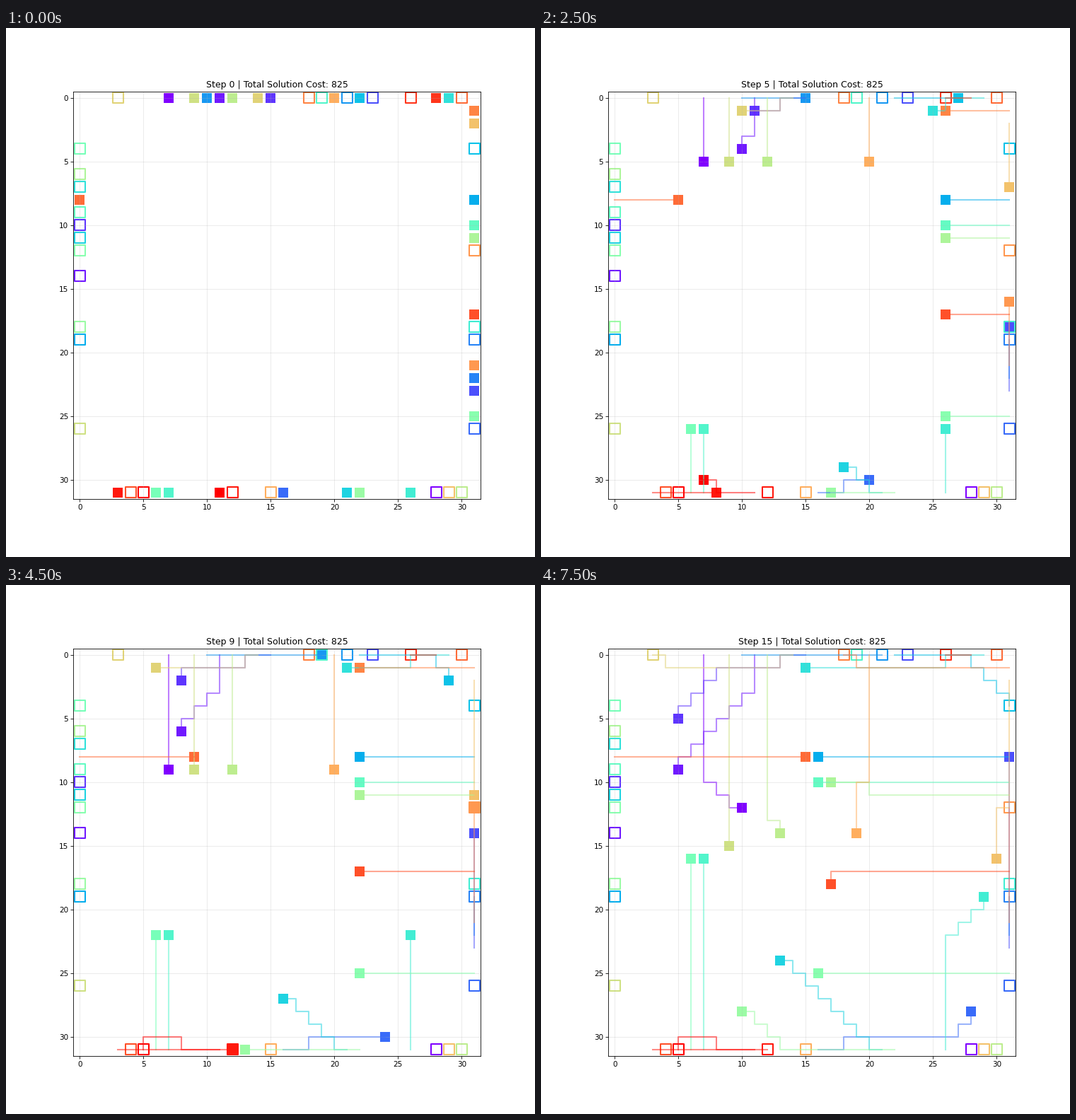
These frames come from a looping animation (748 by 748 pixels, 8 s). A matplotlib script:

```python
import numpy as np
import matplotlib.pyplot as plt
from matplotlib.animation import FuncAnimation

SIZE, DPI = 748, 74.8
STEPS, INTERVAL = 16, 500
COST = 825
MOVES = {"R": (1, 0), "L": (-1, 0), "U": (0, -1), "D": (0, 1)}

# start, goal, route: each token is a run of moves and how often it repeats
AGENTS = [
    ((7, 0), (28, 31), "D10 RD2 R"),
    ((11, 0), (0, 14), "D3 LD6"),
    ((15, 0), (0, 10), "L2 D L4 LD4"),
    ((31, 23), (23, 0), "U15"),
    ((16, 31), (31, 26), "R2 U R8 RU2"),
    ((31, 22), (31, 19), "U3"),
    ((10, 0), (21, 0), "R11"),
    ((31, 8), (0, 19), "L15"),
    ((22, 0), (31, 4), "R5 RD4"),
    ((21, 31), (0, 11), "L UL7"),
    ((29, 0), (0, 7), "L3 D L11"),
    ((26, 31), (31, 18), "U9 RU3"),
    ((7, 31), (19, 0), "U15"),
    ((31, 10), (0, 9), "L15"),
    ((6, 31), (0, 4), "U15"),
    ((31, 25), (0, 12), "L15"),
    ((22, 31), (0, 18), "L9 UL3"),
    ((31, 11), (0, 6), "L11 U L3"),
    ((12, 0), (30, 31), "D13 RD"),
    ((9, 0), (0, 26), "D15"),
    ((14, 0), (3, 0), "L D L9 UL"),
    ((31, 2), (29, 31), "D10 L D4"),
    ((20, 0), (15, 31), "D10 L D4"),
    ((31, 21), (31, 12), "U9"),
    ((31, 1), (18, 0), "L12 UL"),
    ((0, 8), (30, 0), "R15"),
    ((31, 17), (4, 31), "L14 D"),
    ((28, 0), (26, 0), "L2"),
    ((3, 31), (12, 31), "R9"),
    ((11, 31), (5, 31), "L3 U L3 D"),
]


def walk(start, route):
    """Return every cell visited, the start included."""
    cells = [start]
    for token in route.split():
        run = token.rstrip("0123456789")
        for move in run * int(token[len(run):] or 1):
            dx, dy = MOVES[move]
            x, y = cells[-1]
            cells.append((x + dx, y + dy))
    return np.array(cells)


fig, ax = plt.subplots(figsize=(SIZE / DPI, SIZE / DPI), dpi=DPI)
ax.set_aspect("equal")
ax.set_xlim(-0.5, 31.5)
ax.set_ylim(31.5, -0.5)
ax.set_xticks(range(0, 31, 5))
ax.set_yticks(range(0, 31, 5))
ax.grid(True, alpha=0.3)
title = ax.set_title("")

paths, bodies, trails = [], [], []
for (start, goal, route), color in zip(AGENTS, plt.cm.rainbow(np.linspace(0, 1, len(AGENTS)))):
    ax.scatter(*goal, s=200, marker="s", facecolors="none", edgecolors=[color], linewidths=2)
    bodies.append(ax.scatter(*start, s=200, marker="s", color=[color], linewidths=0))
    trails.append(ax.plot([], [], color=color, linewidth=2, alpha=0.5)[0])
    paths.append(walk(start, route))


def update(step):
    title.set_text(f"Step {step} | Total Solution Cost: {COST}")
    for path, body, trail in zip(paths, bodies, trails):
        done = path[:step + 1]
        trail.set_data(done[:, 0], done[:, 1])
        body.set_offsets(done[-1:])
        # an agent leaves the grid one step after reaching its goal
        body.set_visible(step < len(path))
    return [title, *bodies, *trails]


anim = FuncAnimation(fig, update, frames=STEPS, interval=INTERVAL, repeat=True, repeat_delay=0)
plt.show()
```
